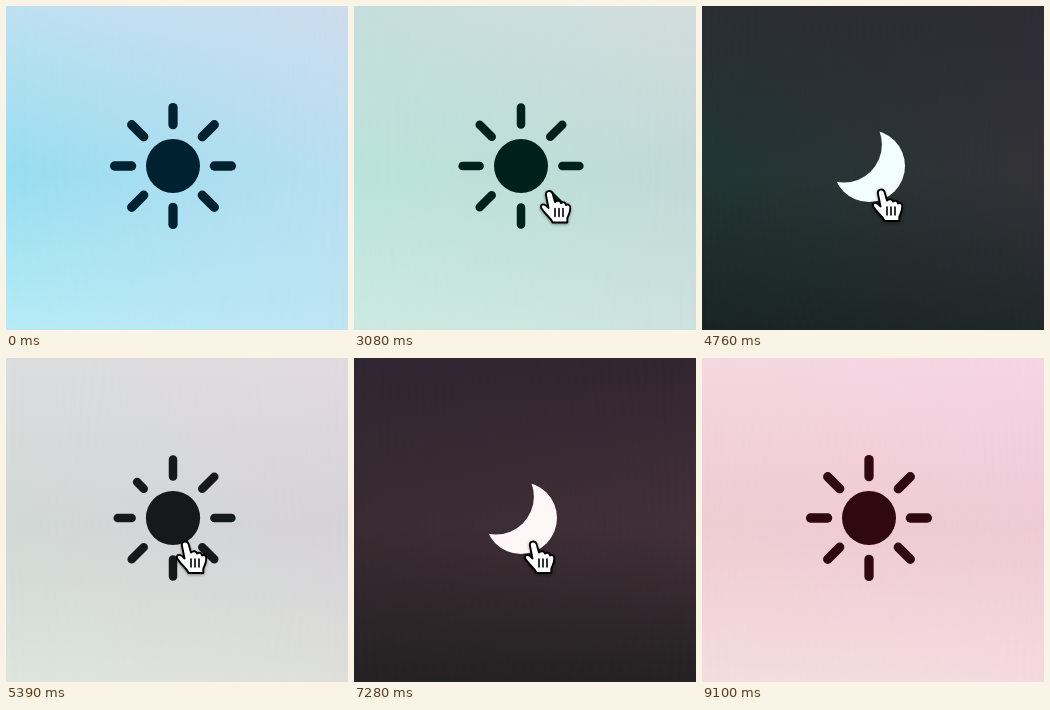
Animation, 342 px wide and 324 px high, one loop 9.17 s. Source, as an HTML page:

```html
<!DOCTYPE html>
<html lang="en">
<head>
<meta charset="utf-8">
<title>Theme toggle</title>
<style>
  html, body { margin: 0; width: 100%; height: 100%; overflow: hidden; }
  #left, #right, svg { position: absolute; left: 0; top: 0; width: 342px; height: 324px; }
  #right { -webkit-mask-image: linear-gradient(90deg, transparent, #000); mask-image: linear-gradient(90deg, transparent, #000); }
  #pointer { filter: drop-shadow(0 1.5px 1.5px rgba(0, 0, 0, .4)); }
</style>
</head>
<body>
<div id="left"></div>
<div id="right"></div>
<svg viewBox="0 0 342 324">
  <mask id="crescent" maskUnits="userSpaceOnUse" x="-80" y="-80" width="160" height="160">
    <rect x="-80" y="-80" width="160" height="160" fill="#fff"/>
    <circle id="cut" r="38" fill="#000"/>
  </mask>
  <g id="icon" transform="translate(167 160)">
    <g mask="url(#crescent)"><circle id="disc" r="27"/></g>
    <g id="rays"></g>
  </g>
  <g id="pointer">
    <path id="arrow" fill="#000" stroke="#fff" stroke-width="2" d="M0 0V27L6.5 21.3 11.5 33 16.2 31 11.2 19.8H19.5Z"/>
    <g id="hand" stroke="#000" stroke-width="1.9" stroke-linejoin="round" stroke-linecap="round">
      <path fill="#fff" d="M-4 5C-5 0 1 -1 2.6 3L5 11.5C7 9.5 10.5 10 11 12.5 13 10.8 15.8 12 16 14.5 18.5 13.2 20.6 15 20.2 18 20 24 17.8 25 17.3 28V32H2.5C1 27.5-5 24-8.8 17.5-10.2 13.5-6 12-1.5 17.5Z"/>
      <path fill="none" stroke-width="1.6" d="M5 18V26M9 18V26M13 18V26"/>
    </g>
  </g>
</svg>
<script>
const LOOP = 9170, STEP = 70;
const $ = id => document.getElementById(id);
const clamp = x => Math.min(1, Math.max(0, x));
const smooth = x => { x = clamp(x); return x * x * (3 - 2 * x); };
const rgb = hex => [0, 2, 4].map(i => parseInt(hex.substr(i, 2), 16));
const palette = (time, colors) => [time, colors.split(' ').flatMap(rgb)];

// Colours per moment: left top/middle/bottom, right top/middle/bottom, icon
const light = [
  palette(0,    'bee1f0 98def1 b6ecf5 cddcee b8def0 bee4f3 002230'),
  palette(1820, 'c2e0e6 a9e2e2 bce9e6 d0dce6 b5dae0 bce0e4 002224'),
  palette(3080, 'c6dede bae4da cceae2 d2dcdc c1d9d7 cde2de 00211b'),
  palette(7840, 'f2dee0 ecced2 f0e0da f2d8e0 eacad6 f0dcd8 2c1016'),
  palette(9100, 'f4d8e0 f0ccd2 f3dede f6d4e4 eecad6 f4dade 30080f')
];
const dark = [
  palette(4760, '2a2e34 213634 1a2424 2e2c34 343238 20282a f2fffc'),
  palette(6370, '302632 3a2c32 242223 322632 423038 242222 fff6f8')
];
const clicks = [3400, 4830, 6250, 7700];
const path = [
  [1330, 352, 334], [1820, 234, 205], [2400, 206, 193], [3080, 196, 184.5],
  [3360, 180, 183], [8050, 180, 183], [8750, 352, 334]
].map(([time, ...point]) => [time, point]);

function sample(keys, t) {
  if (t <= keys[0][0]) return keys[0][1];
  const next = keys.findIndex(k => k[0] > t);
  if (next < 0) return keys[keys.length - 1][1];
  const [t0, a] = keys[next - 1], [t1, b] = keys[next];
  const p = (t - t0) / (t1 - t0);
  return a.map((v, i) => v + (b[i] - v) * p);
}

const rays = Array.from({ length: 8 }, (_, i) => {
  const line = document.createElementNS('http://www.w3.org/2000/svg', 'line');
  line.setAttribute('transform', `rotate(${i * 45})`);
  $('rays').append(line);
  return line;
});

function set(el, attrs) {
  for (const name in attrs) el.setAttribute(name, attrs[name]);
}

function paint(t, isDark) {
  const values = sample(isDark ? dark : light, t);
  const color = i => `rgb(${values.slice(i * 3, i * 3 + 3).map(Math.round)})`;
  ['left', 'right'].forEach((id, side) => {
    const i = side * 3;
    $(id).style.background =
      `linear-gradient(${color(i)}, ${color(i + 1)} 52%, ${color(i + 2)})`;
  });
  set($('icon'), { fill: color(6), stroke: 'none' });
  set($('rays'), { stroke: color(6) });
}

// moon: 0 is a full sun disc, 1 a finished crescent
function drawDisc(moon) {
  const away = 1 - moon;
  const angle = (40.5 + 120 * away) * Math.PI / 180;
  const distance = 33 + 37 * away * away;
  set($('disc'), { r: 36 - 9 * away });
  set($('cut'), { cx: -distance * Math.cos(angle), cy: -distance * Math.sin(angle) });
}

function drawRays(since, isDark, hover) {
  rays.forEach((ray, i) => {
    const grow = clamp((since - 105 - i * 50) / 190);
    const inner = isDark ? 40 : 41.4;
    const outer = isDark ? 62 - 22 * clamp(since / 260) : inner + 17 * grow;
    set(ray, {
      y1: -inner, y2: -outer,
      'stroke-width': hover ? 8.5 : 9.3,
      'stroke-linecap': isDark ? 'butt' : 'round',
      visibility: outer > inner ? 'visible' : 'hidden'
    });
  });
}

function draw(t) {
  const done = clicks.filter(c => c <= t);
  const isDark = done.length % 2 === 1;
  const since = done.length ? t - done[done.length - 1] : Infinity;
  const [x, y] = sample(path, t);
  const hover = x < 230 && y < 223;
  paint(t, isDark);
  drawDisc(isDark ? smooth((since - 130) / 500) : 1 - smooth(since / 600));
  drawRays(since, isDark, hover);
  set($('pointer'), { transform: `translate(${x} ${y})` });
  set($('arrow'), { visibility: hover ? 'hidden' : 'visible' });
  set($('hand'), { visibility: hover ? 'visible' : 'hidden' });
}

const start = performance.now();
function tick() {
  const t = (performance.now() - start) % LOOP;
  draw(Math.floor(t / STEP) * STEP);
  requestAnimationFrame(tick);
}
tick();
</script>
</body>
</html>
```
